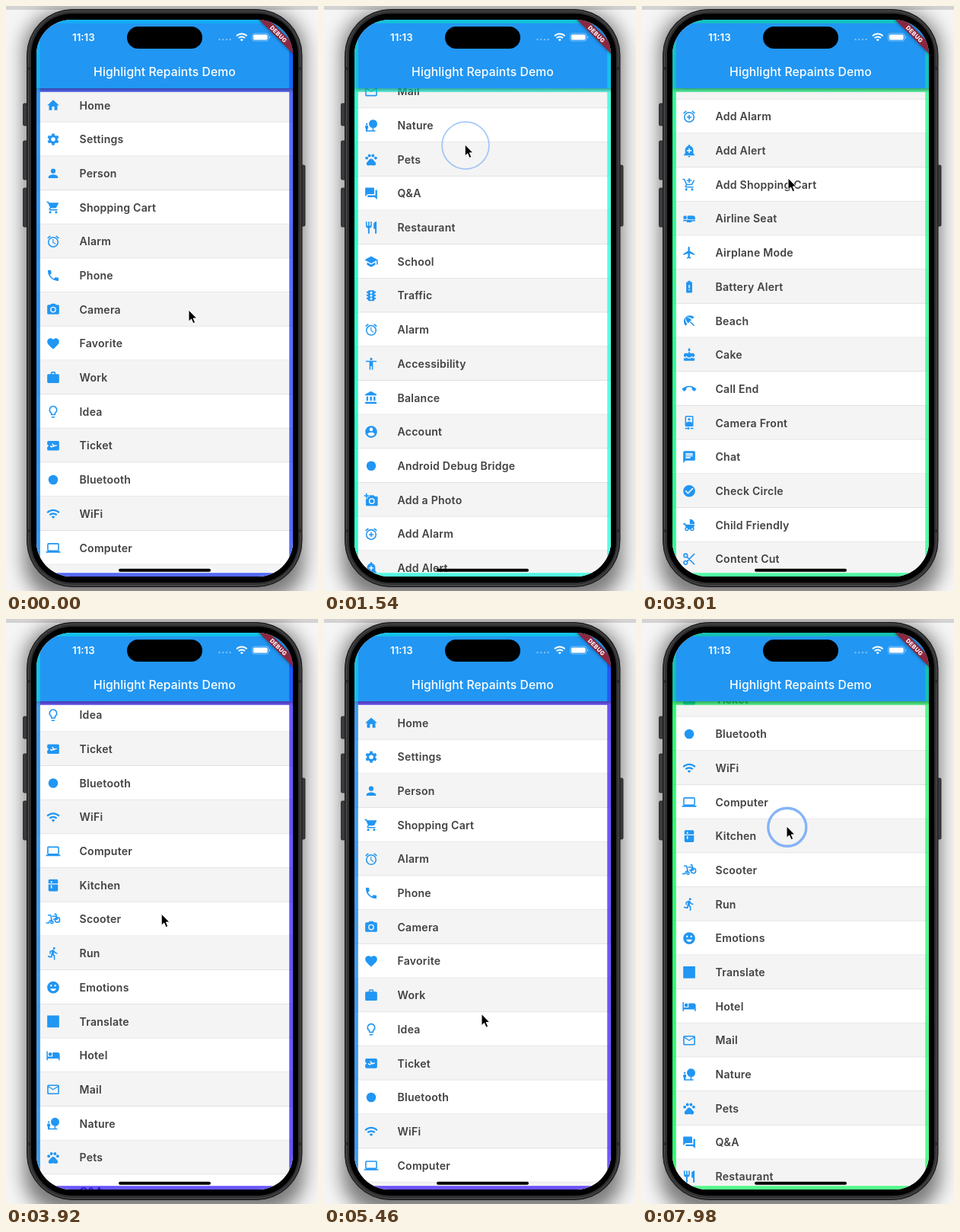
An HTML page that plays this animation: 410x768 px, repeating every 8 s.

```html
<!DOCTYPE html>
<html lang="en">
<head>
<meta charset="utf-8">
<title>Highlight Repaints Demo</title>
<style>
html, body { margin: 0; width: 100%; height: 100%; overflow: hidden; background: #fff; }
svg { display: block; width: 410px; height: 768px; }
text { font-family: Inter, Roboto, sans-serif; }
.label { font-size: 14.1px; font-weight: 600; letter-spacing: .22px; fill: #424242; }
.icon { fill: #2196f3; fill-rule: evenodd; }
.line { fill: none; stroke: #2196f3; stroke-width: 2; }
.edge { fill: none; stroke-width: 4.8; }
</style>
</head>
<body>
<svg viewBox="0 0 410 768">
  <defs>
    <filter id="blur" x="-20%" y="-10%" width="140%" height="120%"><feGaussianBlur stdDeviation="12"/></filter>
    <filter id="soft" x="-20%" y="-60%" width="140%" height="220%"><feGaussianBlur stdDeviation="2"/></filter>
    <clipPath id="screen"><rect x="40" y="18" width="337" height="731" rx="46"/></clipPath>
    <clipPath id="body"><rect x="40" y="108" width="337" height="641"/></clipPath>
    <linearGradient id="shade" x2="0" y2="1">
      <stop stop-color="#000" stop-opacity=".32"/><stop offset="1" stop-color="#000" stop-opacity="0"/>
    </linearGradient>
  </defs>

  <rect width="410" height="768" fill="#f5f5f5"/>
  <rect x="24" y="8" width="368" height="772" rx="50" opacity=".5" filter="url(#blur)"/>
  <rect width="410" height="5" opacity=".14"/>
  <g fill="#3b3b3d" stroke="#232325" stroke-width=".8">
    <rect x="22.5" y="128" width="7" height="29" rx="1.5"/>
    <rect x="22.5" y="177" width="7" height="51" rx="1.5"/>
    <rect x="22.5" y="239" width="7" height="51" rx="1.5"/>
    <rect x="386" y="209" width="7" height="80" rx="1.5"/>
  </g>
  <rect x="27.5" y="4.5" width="361.5" height="758" rx="60" fill="#303032" stroke="#1c1c1e"/>
  <rect x="29.5" y="6.5" width="357.5" height="754" rx="58" fill="none" stroke="#4c4c4f"/>
  <path d="M27 82h6M27 689h6M384 82h5M384 689h5" stroke="#29292b" stroke-width="4"/>
  <rect x="33" y="10" width="351" height="747" rx="54"/>

  <g clip-path="url(#screen)">
    <rect x="40" y="18" width="337" height="731" fill="#fff"/>
    <g clip-path="url(#body)"><g id="list"></g></g>
    <rect id="listEdge" class="edge" x="42.4" y="110.4" width="332.2" height="636.2" opacity=".66"/>
    <rect x="40" y="18" width="337" height="90" fill="#2196f3"/>
    <rect x="40" y="108" width="337" height="6" fill="url(#shade)"/>
    <path id="pageEdge" class="edge" d="M42.4 749V20.4H377" opacity=".42"/>
    <path id="sideEdge" class="edge" d="M374.6 22.8V108" opacity=".42"/>
    <text x="208.5" y="91.8" text-anchor="middle" font-size="15.7" font-weight="500" letter-spacing=".1" fill="#fff">Highlight Repaints Demo</text>
    <text x="87" y="46" font-size="13.4" font-weight="600" fill="#fff">11:13</text>
    <rect x="159" y="27" width="99" height="29" rx="14.5"/>
    <path d="M280.5 44h16" stroke="#fff" stroke-width="2.4" stroke-linecap="round" stroke-dasharray="0 4.7" opacity=".4"/>
    <path id="signal" transform="translate(301.6 32.6) scale(.68)" fill="#fff"/>
    <rect x="323.5" y="36" width="21.5" height="10" rx="3" fill="none" stroke="#fff" stroke-opacity=".45" stroke-width=".9"/>
    <rect x="324.9" y="37.4" width="18.7" height="7.2" rx="1.9" fill="#fff"/>
    <path d="M346 39.3v3.4a1.8 1.8 0 0 0 0-3.4z" fill="#fff" opacity=".5"/>
    <g transform="translate(377 18) rotate(45)">
      <rect x="-32" y="22" width="64" height="9.4" opacity=".5" filter="url(#soft)"/>
      <rect x="-32" y="22" width="64" height="9.4" fill="#8c2740"/>
      <text y="29.5" text-anchor="middle" font-size="7.6" font-weight="800" letter-spacing=".3" fill="#fff">DEBUG</text>
    </g>
    <rect x="148" y="738.8" width="121" height="4" rx="2"/>
  </g>

  <circle id="ring" fill="none" stroke="#7fb0f7"/>
  <path id="cursor" d="M0 0V15.3L3.5 12 6 17.7 8.6 16.5 6.2 11H10.800Z" stroke="#fff" stroke-width="1"/>
</svg>

<script>
const LOOP = 8000, STEP = 70, ROW = 44.69, TOP = 108;
const $ = id => document.getElementById(id);

const circle = (x, y, r) => `M${x - r} ${y}a${r} ${r} 0 1 0 ${2 * r} 0a${r} ${r} 0 1 0 ${-2 * r} 0z`;
const gear = () => {
  const points = [];
  for (let tooth = 30; tooth < 390; tooth += 60)
    for (const [turn, r] of [[-12, 10], [12, 10], [19, 7.4], [41, 7.4]]) {
      const a = (tooth + turn) * Math.PI / 180;
      points.push((12 + r * Math.cos(a)).toFixed(2) + ' ' + (12 + r * Math.sin(a)).toFixed(2));
    }
  return 'M' + points.join('L') + 'z';
};

const clock = 'M22 5.72l-4.6-3.86-1.29 1.53 4.6 3.86zM7.88 3.39L6.6 1.86 2 5.71l1.29 1.53z' + circle(12, 13, 9) + circle(12, 13, 7);
const alarm = clock + 'M12.5 8H11v6l4.75 2.85.75-1.23-4-2.37z';
const wheels = circle(7, 20, 2) + circle(17, 20, 2);
const waves = 'M1 9l2 2c4.97-4.97 13.03-4.97 18 0l2-2C16.93 2.93 7.08 2.93 1 9zm8 8l3 3 3-3a4.24 4.24 0 0 0-6 0zm-4-4l2 2a7.07 7.07 0 0 1 10 0l2-2C15.14 9.14 8.87 9.14 5 13z';

// Each item: label, filled path, optional stroked path (24-unit grid).
const items = [
  ['Home', 'M10 20v-6h4v6h5v-8h3L12 3 2 12h3v8z'],
  ['Settings', gear() + circle(12, 12, 3.5)],
  ['Person', circle(12, 8, 4) + 'M12 14c-2.67 0-8 1.34-8 4v2h16v-2c0-2.66-5.33-4-8-4z'],
  ['Shopping Cart', wheels + 'M1 2v2h2l3.6 7.59-1.35 2.45c-.8 1.4.2 2.96 1.75 2.96h12v-2H7.42c-.2 0-.3-.2-.22-.37l.9-1.63h7.45c.75 0 1.41-.41 1.75-1.03l3.58-6.49A1 1 0 0 0 20 4H5.21l-.94-2z'],
  ['Alarm', alarm],
  ['Phone', 'M6.62 10.79c1.44 2.83 3.76 5.14 6.59 6.59l2.2-2.2c.27-.27.67-.36 1.02-.24 1.12.37 2.33.57 3.57.57.55 0 1 .45 1 1V20c0 .55-.45 1-1 1-9.39 0-17-7.61-17-17 0-.55.45-1 1-1h3.5c.55 0 1 .45 1 1 0 1.25.2 2.45.57 3.57.11.35.03.74-.25 1.02z'],
  ['Camera', 'M9 2L7.17 4H4a2 2 0 0 0-2 2v12a2 2 0 0 0 2 2h16a2 2 0 0 0 2-2V6a2 2 0 0 0-2-2h-3.17L15 2z' + circle(12, 12, 5) + circle(12, 12, 3.2)],
  ['Favorite', 'M12 21.35l-1.45-1.32C5.4 15.36 2 12.28 2 8.5 2 5.42 4.42 3 7.5 3c1.74 0 3.41.81 4.5 2.09C13.09 3.81 14.76 3 16.5 3 19.58 3 22 5.42 22 8.5c0 3.78-3.4 6.86-8.55 11.54z'],
  ['Work', 'M20 6h-4V4a2 2 0 0 0-2-2h-4a2 2 0 0 0-2 2v2H4a2 2 0 0 0-2 2v11a2 2 0 0 0 2 2h16a2 2 0 0 0 2-2V8a2 2 0 0 0-2-2zm-6 0h-4V4h4z'],
  ['Idea', 'M9 21c0 .55.45 1 1 1h4c.55 0 1-.45 1-1v-1H9zm3-19a7 7 0 0 0-4 12.74V17c0 .55.45 1 1 1h6c.55 0 1-.45 1-1v-2.26A7 7 0 0 0 12 2zm2.85 11.1l-.85.6V16h-4v-2.3l-.85-.6a5 5 0 1 1 5.7 0z'],
  ['Ticket', 'M20 4H4a2 2 0 0 0-2 2v4a2 2 0 0 1 0 4v4a2 2 0 0 0 2 2h16a2 2 0 0 0 2-2V6a2 2 0 0 0-2-2zM6.5 12l1.2-.3 1.4 1 2.6-.7-2.2-3.7 1.3-.3 3.7 3.3 2.6-.7c1.5-.3 1.8 1.4.6 1.8L8.2 15z'],
  ['Bluetooth', circle(12, 12, 8)],
  ['WiFi', waves],
  ['Computer', 'M20 18a2 2 0 0 0 2-2V6a2 2 0 0 0-2-2H4a2 2 0 0 0-2 2v10a2 2 0 0 0 2 2H0v2h24v-2zM4 6h16v10H4z'],
  ['Kitchen', 'M4 9V4a2 2 0 0 1 2-2h12a2 2 0 0 1 2 2v5zM8 5v3h2V5zM4 10.5h16V20a2 2 0 0 1-2 2H6a2 2 0 0 1-2-2zM8 12v5h2v-5z'],
  ['Scooter', circle(10, 17, 3) + circle(10, 17, 1) + 'M10 14h.74L8.82 5.56A2 2 0 0 0 6.87 4H3v2h3.870l1.420 6.250A6 6 0 0 0 4.090 17H0v2h6v-1a4 4 0 0 1 4-4z', circle(19, 13, 4) + 'M10 7h7M14 3h2.500L19 13M12 12h7'],
  ['Run', circle(13.5, 3.5, 2) + 'M9.89 19.38l1-4.4 2.1 2v6h2v-7.5l-2.1-2 .6-3c1.3 1.5 3.3 2.5 5.5 2.5v-2c-1.9 0-3.5-1-4.3-2.4l-1-1.6c-.4-.6-1-1-1.7-1-.3 0-.5.1-.8.1L6 8.28v4.7h2v-3.4l1.8-.7-1.6 8.1-4.9-1-.4 2z'],
  ['Emotions', circle(12, 12, 10) + circle(8.5, 9, 1.5) + circle(15.5, 9, 1.5) + 'M12 18c-2.28 0-4.22-1.66-5-4h10c-.78 2.34-2.72 4-5 4z'],
  ['Translate', 'M2 2h20v20H2z'],
  ['Hotel', circle(7, 10, 3) + 'M19 7h-8v7H3V5H1v15h2v-3h18v3h2v-9a4 4 0 0 0-4-4z'],
  ['Mail', 'M20 4H4a2 2 0 0 0-2 2v12a2 2 0 0 0 2 2h16a2 2 0 0 0 2-2V6a2 2 0 0 0-2-2zm0 14H4V8l8 5 8-5zm-8-7L4 6h16z'],
  ['Nature', circle(4.5, 9.5, 1.5) + 'M22.17 9.17a7 7 0 1 0-8.17 6.89V20H6v-3h1v-4c0-.55-.45-1-1-1H3c-.55 0-1 .45-1 1v4h1v5h16v-2h-3v-3.88a7 7 0 0 0 6.17-6.95z'],
  ['Pets', circle(4.5, 9.5, 2.5) + circle(9, 5.5, 2.5) + circle(15, 5.5, 2.5) + circle(19.5, 9.5, 2.5) + 'M17.34 14.86l-2.48-2.91c-1.6-1.8-4.1-1.8-5.72 0l-2.48 2.91c-1.31 1.31-2.92 2.76-2.62 4.79.29 1.02 1.02 2.03 2.33 2.32 1.4.2 3.2-.44 5.63-.44s4.3.64 5.63.44c1.31-.29 2.04-1.31 2.33-2.32.31-2.04-1.3-3.49-2.62-4.79z'],
  ['Q&A', 'M21 6h-2v9H6v2c0 .55.45 1 1 1h11l4 4V7c0-.55-.45-1-1-1zm-4 6V3c0-.55-.45-1-1-1H3c-.55 0-1 .45-1 1v14l4-4h10c.55 0 1-.45 1-1z'],
  ['Restaurant', 'M11 9H9V2H7v7H5V2H3v7c0 2.12 1.66 3.84 3.75 3.97V22h2.5v-9.03C11.34 12.84 13 11.12 13 9V2h-2zm5-3v8h2.5v8H21V2c-2.76 0-5 2.24-5 4z'],
  ['School', 'M5 13.18v4L12 21l7-3.82v-4L12 17zM12 3L1 9l11 6 9-4.91V17h2V9z'],
  ['Traffic', 'M20 10h-3V8.86A4 4 0 0 0 20 5h-3V4c0-.55-.45-1-1-1H8c-.55 0-1 .45-1 1v1H4a4 4 0 0 0 3 3.86V10H4a4 4 0 0 0 3 3.86V15H4a4 4 0 0 0 3 3.86V20c0 .55.45 1 1 1h8c.55 0 1-.45 1-1v-1.14A4 4 0 0 0 20 15h-3v-1.14A4 4 0 0 0 20 10z' + circle(12, 7, 2) + circle(12, 12, 2) + circle(12, 17, 2)],
  ['Alarm', alarm],
  ['Accessibility', circle(12, 4, 2) + 'M21 9h-6v13h-2v-6h-2v6H9V9H3V7h18z'],
  ['Balance', 'M4 10v7h3v-7zm6 0v7h3v-7zM2 22h19v-3H2zm14-12v7h3v-7zm-4.5-9L2 6v2h19V6z'],
  ['Account', circle(12, 12, 10) + circle(12, 8, 3) + 'M12 19.2a7.2 7.2 0 0 1-6-3.22c.03-1.99 4-3.08 6-3.08s5.97 1.09 6 3.08a7.2 7.2 0 0 1-6 3.22z'],
  ['Android Debug Bridge', circle(12, 12, 8)],
  ['Add a Photo', 'M3 4V1h2v3h3v2H5v3H3V6H0V4zm3 6V7h3V4h7l1.83 2H21a2 2 0 0 1 2 2v12a2 2 0 0 1-2 2H5a2 2 0 0 1-2-2V10z' + circle(13, 14, 5) + circle(13, 14, 3.2)],
  ['Add Alarm', clock + 'M13 9h-2v3H8v2h3v3h2v-3h3v-2h-3z'],
  ['Add Alert', 'M10 21a2 2 0 0 0 4 0zM18.88 16.82V11c0-3.25-2.25-5.97-5.29-6.69v-.72a1.59 1.59 0 0 0-3.18 0v.72C7.37 5.03 5.12 7.75 5.12 11v5.82L3 18.94V20h18v-1.06zM16 13h-3v3h-2v-3H8v-2h3V8h2v3h3z'],
  ['Add Shopping Cart', wheels + 'M11 9h2V6h3V4h-3V1h-2v3H8v2h3zM7.2 14.63l.9-1.63h7.45c.75 0 1.41-.41 1.75-1.03l3.86-7.01L19.42 4l-3.87 7H8.53L4.27 2H1v2h2l3.6 7.59-1.35 2.45c-.8 1.4.2 2.96 1.75 2.96h12v-2H7.42c-.2 0-.3-.2-.22-.37z'],
  ['Airline Seat', circle(5, 10, 3) + 'M22 11v2H9V7h9a4 4 0 0 1 4 4zM2 14v2h6v2h8v-2h6v-2z'],
  ['Airplane Mode', 'M21 16v-2l-8-5V3.5a1.5 1.5 0 0 0-3 0V9l-8 5v2l8-2.5V19l-2 1.5V22l3.5-1 3.5 1v-1.5L13 19v-5.5z'],
  ['Battery Alert', 'M15.67 4H14V2h-4v2H8.33C7.6 4 7 4.6 7 5.33v15.33C7 21.4 7.6 22 8.33 22h7.33c.74 0 1.34-.6 1.34-1.33V5.33C17 4.6 16.4 4 15.67 4zM13 18h-2v-2h2zm0-4h-2V9h2z'],
  ['Beach', 'M13.13 14.56l1.43-1.43L21 19.57 19.57 21zm4.29-5.73l2.86-2.86c-3.95-3.95-10.35-3.96-14.3-.02 3.93-1.3 8.31-.25 11.44 2.88zM5.95 5.98c-3.94 3.95-3.93 10.35.02 14.3l2.86-2.86C5.7 14.29 4.65 9.91 5.95 5.98zm.02-.02c-.38 3.01 1.17 6.88 4.3 10.02L16 10.25c-3.13-3.13-7.01-4.68-10.03-4.29z'],
  ['Cake', 'M12 6a2 2 0 0 0 1.71-3.03L12 0l-1.71 2.97A2 2 0 0 0 12 6zM18 9h-5V7h-2v2H6a3 3 0 0 0-3 3v2l2 2 2.7-2 2.2 2h4.2l2.2-2L19 16l2-2v-2a3 3 0 0 0-3-3zM3 17v4c0 .55.45 1 1 1h16c.55 0 1-.45 1-1v-4l-2 .9-2.7-1.5-2.2 1.5H9.9l-2.2-1.5L5 17.9z'],
  ['Call End', 'M12 9c-1.6 0-3.15.25-4.6.72v3.1c0 .39-.23.74-.56.9-.98.49-1.87 1.12-2.66 1.85-.4.38-1 .38-1.41-.01L.29 13.08a1 1 0 0 1 0-1.41C3.34 8.78 7.46 7 12 7s8.66 1.78 11.71 4.67a1 1 0 0 1 0 1.41l-2.48 2.48c-.39.39-1 .37-1.41.01-.79-.74-1.69-1.36-2.67-1.85-.33-.16-.56-.5-.56-.9v-3.1C15.15 9.25 13.6 9 12 9z'],
  ['Camera Front', circle(12, 6, 2) + 'M10 20H5v2h5v2l3-3-3-3zm4 0v2h5v-2zM17 0H7a2 2 0 0 0-2 2v14a2 2 0 0 0 2 2h10a2 2 0 0 0 2-2V2a2 2 0 0 0-2-2zM7 2h10v10.5c0-1.67-3.33-2.5-5-2.5s-5 .83-5 2.5z'],
  ['Chat', 'M20 2H4a2 2 0 0 0-2 2v18l4-4h14a2 2 0 0 0 2-2V4a2 2 0 0 0-2-2zM6 9h12v2H6zm8 5H6v-2h8zm4-6H6V6h12z'],
  ['Check Circle', circle(12, 12, 10) + 'M10 17l-5-5 1.41-1.41L10 14.17l7.59-7.59L19 8z'],
  ['Child Friendly', 'M13 2v8h8a8 8 0 0 0-8-8zm6.32 13.89A7.95 7.95 0 0 0 21 11H6.44l-.95-2H2v2h2.22s1.89 4.07 2.12 4.42A3.49 3.49 0 1 0 11.46 19h2.08a3.49 3.49 0 1 0 5.78-3.11z' + circle(8, 18.5, 1.5) + circle(17, 18.5, 1.5)],
  ['Content Cut', '', circle(6, 6, 3) + circle(6, 18, 3) + 'M8.2 8.2L21 21M8.2 15.8L21 3']
];

$('signal').setAttribute('d', waves);
$('list').innerHTML = items.map(([label, fill, line = ''], i) => `
  <g transform="translate(40 ${(TOP + i * ROW).toFixed(2)})">
    <rect width="337" height="${ROW}" fill="${i % 2 ? '#fff' : '#f4f4f4'}"/>
    <path d="M0 44.2h337" stroke="#dedede" stroke-width=".9"/>
    <g transform="translate(12.6 13) scale(.784)"><path class="icon" d="${fill}"/><path class="line" d="${line}"/></g>
    <text class="label" x="56.5" y="27.6">${label.replace('&', '&amp;')}</text>
  </g>`).join('');

// Keys are [time, value, power]; power shapes the ease-out leading to the key.
const at = (keys, t) => {
  const i = keys.findIndex(k => k[0] > t);
  if (i < 0) return keys[keys.length - 1][1];
  const [t0, v0] = keys[i - 1], [t1, v1, power = 1] = keys[i];
  return v0 + (v1 - v0) * (1 - (1 - (t - t0) / (t1 - t0)) ** power);
};

const scroll = [[0, 0], [210, 0], [420, 150], [980, 549, 2], [1120, 560], [1400, 745], [2100, 1209, 2], [2380, 1212],
  [2600, 1342], [3010, 1460, 2], [3220, 1460], [3430, 1180], [4130, 330, 2], [4550, -53], [4760, -210.5, 2],
  [5950, 0, 4], [6860, 0], [7070, 160], [7630, 384, 2], [7980, 471]];
const cursorX = [[0, 240], [980, 229], [1400, 186], [2100, 182], [3010, 192], [4130, 207], [4550, 209], [5400, 207], [6790, 207], [7980, 190]];
const cursorY = [[0, 399], [210, 400], [420, 250], [980, 318], [1120, 370], [1400, 185], [2100, 169], [2380, 360], [2600, 230],
  [3010, 226], [3220, 240], [3430, 520], [4130, 330], [4550, 712], [5200, 712], [5900, 392, 2], [6860, 392], [7070, 232], [7630, 359], [7980, 272]];
const listHue = [[0, 232], [980, 650], [2100, 1132], [3010, 1590], [4760, 2468], [6160, 3070], [6230, 3070], [6790, 3284], [7980, 3740]];
const pageHue = [[0, 190], [980, 190], [2100, 135], [3010, 150], [4760, 190], [6790, 135], [7980, 140]];
const presses = [[210, 420], [1120, 1400], [2380, 2600], [3220, 3430], [4130, 4550], [6860, 7070], [7630, 8000]];
const FADE = 260;

function drawRing(t, x, y) {
  const press = presses.find(([down, up]) => t >= down && t < up + FADE);
  const ring = $('ring');
  ring.setAttribute('visibility', press ? 'visible' : 'hidden');
  if (!press) return;
  const gone = Math.max(0, (t - press[1]) / FADE);
  ring.setAttribute('cx', x + .8);
  ring.setAttribute('cy', y + 1.3);
  ring.setAttribute('r', 25 + 11 * gone);
  ring.setAttribute('stroke-width', 3 * (1 - gone) + .4);
  ring.setAttribute('opacity', .95 - .5 * gone);
}

function draw(time) {
  const t = Math.floor(time % LOOP / STEP) * STEP;
  const x = at(cursorX, t), y = at(cursorY, t);
  const tint = `hsl(${at(listHue, t) % 360} 100% 50%)`;
  $('list').setAttribute('transform', `translate(0 ${(-at(scroll, t)).toFixed(2)})`);
  $('listEdge').setAttribute('stroke', tint);
  $('sideEdge').setAttribute('stroke', tint);
  $('pageEdge').setAttribute('stroke', `hsl(${at(pageHue, t)} 100% 50%)`);
  $('cursor').setAttribute('transform', `translate(${x} ${y})`);
  $('cursor').setAttribute('visibility', t > 4500 && t < 5300 ? 'hidden' : 'visible');
  drawRing(t, x, y);
}

function tick() {
  draw(performance.now());
  requestAnimationFrame(tick);
}
tick();
</script>
</body>
</html>
```
